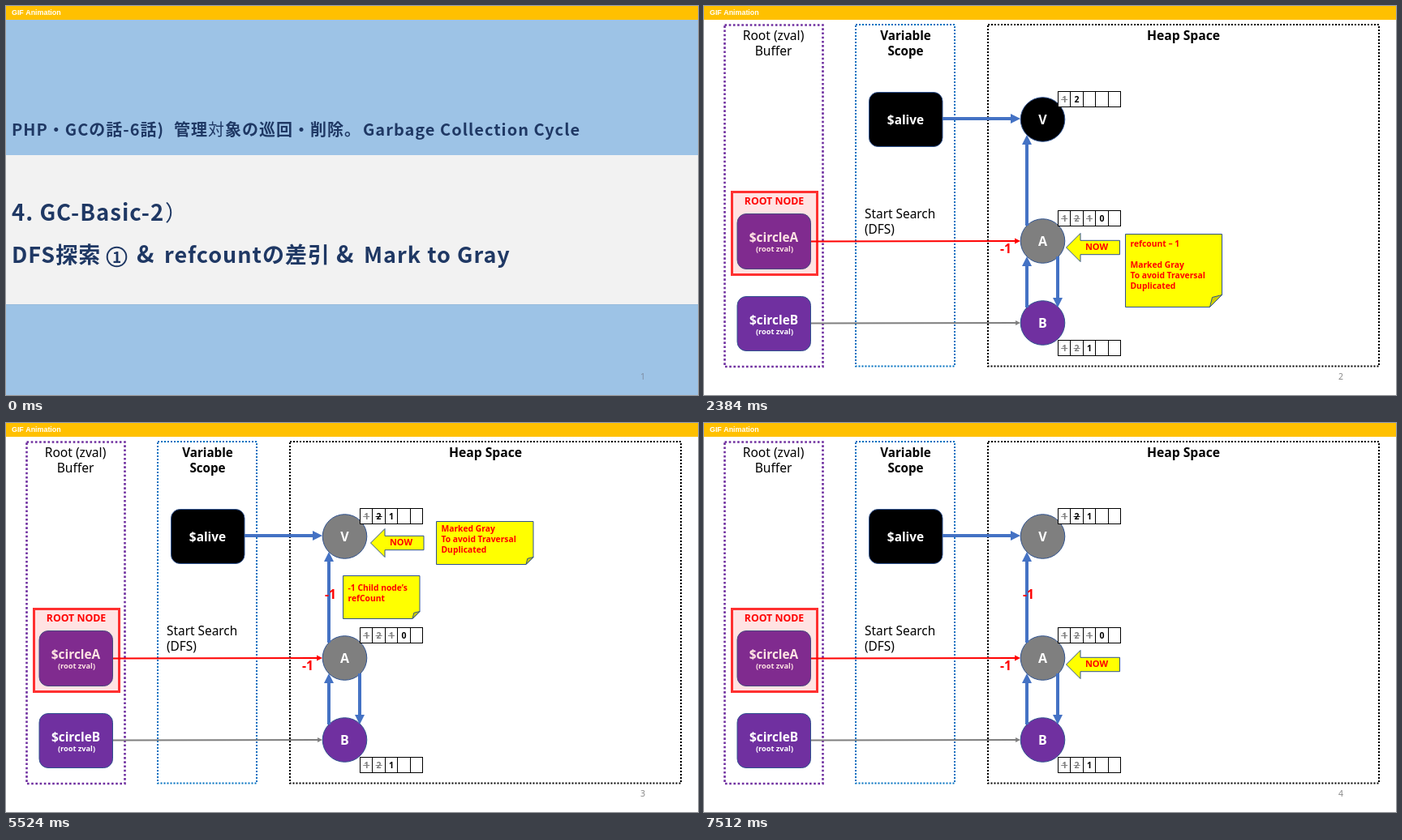
An HTML page with a canvas that plays this animation: 853x480 px, repeating every 8 s.

```html
<!DOCTYPE html>
<html lang="ja">
<head>
<meta charset="utf-8">
<title>GC cycle: mark to gray</title>
<style>
  html, body { margin: 0; width: 100%; height: 100%; overflow: hidden; background: #fff; }
  canvas { display: block; }
</style>
</head>
<body>
<canvas id="stage" width="853" height="480"></canvas>
<script>
const ctx = document.getElementById("stage").getContext("2d");
const LOOP = 8000;
const STARTS = [0, 500, 3640, 6780];
const SANS = '"Noto Sans", "Open Sans", sans-serif';
const CJK = '"Noto Sans CJK JP", "Noto Sans CJK", sans-serif';
const ARIAL = '"Liberation Sans", Arial, sans-serif';
const BLUE = "#4472c4", EDGE = "#2f528f", GRAY = "#7f7f7f";
const PURPLE = "#7030a0", RED = "#ff0000", NAVY = "#1f3864";

function text(str, x, y, size, { color = "#000", weight = 700, align = "center", family = SANS } = {}) {
  ctx.font = `${weight} ${size}px ${family}`;
  ctx.fillStyle = color;
  ctx.textAlign = align;
  ctx.fillText(str, x, y);
}

function heading(str, x, y, size, weight = 700) {
  ctx.letterSpacing = "1px";
  text(str, x, y, size, { color: NAVY, weight, align: "left", family: CJK });
  ctx.letterSpacing = "0px";
}

function rect(x, y, w, h, color) {
  ctx.fillStyle = color;
  ctx.fillRect(x, y, w, h);
}

function polygon(points, fill, stroke) {
  ctx.beginPath();
  points.forEach(([x, y]) => ctx.lineTo(x, y));
  ctx.closePath();
  ctx.fillStyle = fill;
  ctx.fill();
  if (stroke) {
    ctx.strokeStyle = stroke;
    ctx.lineWidth = 1;
    ctx.stroke();
  }
}

function dottedFrame(x, y, w, h, color, dot) {
  ctx.strokeStyle = color;
  ctx.lineWidth = dot;
  ctx.setLineDash([dot, dot]);
  ctx.strokeRect(x, y, w, h);
  ctx.setLineDash([]);
}

function arrow(x1, y1, x2, y2, color, width, head) {
  const length = Math.hypot(x2 - x1, y2 - y1);
  ctx.save();
  ctx.translate(x1, y1);
  ctx.rotate(Math.atan2(y2 - y1, x2 - x1));
  rect(0, -width / 2, length - head + 1, width, color);
  polygon([[length, 0], [length - head, -head / 2], [length - head, head / 2]], color);
  ctx.restore();
}

function box(y, h, fill, label, sub) {
  const x = sub ? 41 : 203.5;
  ctx.beginPath();
  ctx.roundRect(x, y, 90.5, h, 11);
  ctx.fillStyle = fill;
  ctx.fill();
  ctx.strokeStyle = EDGE;
  ctx.lineWidth = 1;
  ctx.stroke();
  text(label, x + 45, y + (sub ? 34.5 : 39.5), 15.4, { color: "#fff" });
  if (sub) text(sub, x + 46, y + 46.5, 9.2, { color: "#fff" });
}

function node(label, y, fill) {
  ctx.beginPath();
  ctx.arc(417.5, y, 27.3, 0, Math.PI * 2);
  ctx.fillStyle = fill;
  ctx.fill();
  ctx.strokeStyle = EDGE;
  ctx.lineWidth = 1;
  ctx.stroke();
  text(label, 417.5, y + 6, 16, { color: "#fff" });
}

// The last count is current; all earlier ones are struck out.
function counter(y, counts, darkFrom = counts.length - 1) {
  const x = 436.5, step = 15.4, h = 19;
  rect(x, y, step * 5, h, "#fff");
  ctx.strokeStyle = "#000";
  ctx.lineWidth = 1;
  ctx.strokeRect(x, y, 77, h);
  for (let i = 1; i < 5; i++) rect(Math.round(x + step * i - 0.5), y, 1, h, "#000");
  counts.forEach((n, i) => {
    const cx = x + step * (i + 0.5);
    const color = i < darkFrom ? GRAY : "#000";
    text(n, cx, y + 13.5, 10.5, { color });
    if (i < counts.length - 1) rect(cx - 4, y + 9.5, 8, 1, color);
  });
}

function nowArrow(x, y, width, neck) {
  polygon([
    [x, y], [x + neck, y - 17.5], [x + neck, y - 8.7], [x + width, y - 8.7],
    [x + width, y + 8.7], [x + neck, y + 8.7], [x + neck, y + 17.5]
  ], "#ffff00", EDGE);
  text("NOW", x + 37.5, y + 3, 11, { color: RED });
}

function note(x, y, w, h, fold, lines, firstLine) {
  const r = x + w, b = y + h;
  polygon([[x, y], [r, y], [r, b - fold], [r - fold, b], [x, b]], "#ffff00", EDGE);
  polygon([[r - fold, b], [r - fold * 0.8, b - fold * 0.8], [r, b - fold]], "#cdcd00", EDGE);
  lines.forEach((line, i) =>
    text(line, x + 6, firstLine + i * 13, 10.3, { color: RED, align: "left" }));
}

function circledOne(x, y) {
  ctx.beginPath();
  ctx.arc(x, y, 11.8, 0, Math.PI * 2);
  ctx.strokeStyle = NAVY;
  ctx.lineWidth = 2;
  ctx.stroke();
  text("1", x, y + 7, 19, { color: NAVY, family: CJK });
}

function titleSlide() {
  rect(0, 0, 853, 480, "#9dc3e6");
  rect(0, 184, 853, 184, "#f2f2f2");
  rect(0, 368, 853, 1, "#98bbdc");

  heading("PHP・GCの話-6話)", 7, 160, 20);
  heading("管理", 207, 160, 20);
  heading("対", 249, 160, 20, 400);
  heading("象の巡回・削除。", 270, 160, 20);
  heading("Garbage Collection Cycle", 440, 160, 20);

  heading("4. GC-Basic-2", 7, 265, 27.5);
  heading("）", 196, 265, 27, 400);

  heading("DFS探索", 7, 317, 27);
  circledOne(136.5, 309.5);
  heading("&", 161, 317, 29);
  heading("refcountの差引", 195, 317, 27);
  heading("&", 407, 317, 29);
  heading("Mark to Gray", 441, 317, 27);
}

function diagram(step) {
  const visitedV = step > 1;
  rect(0, 0, 853, 480, "#fff");

  dottedFrame(25.5, 23.5, 121, 421.5, PURPLE, 2.6);
  dottedFrame(187, 23, 122, 421.5, "#0070c0", 2);
  dottedFrame(350, 23, 482, 421.5, "#000", 2);
  text("Root (zval)", 85.5, 42, 15.6, { weight: 400 });
  text("Buffer", 85.5, 61, 15.6, { weight: 400 });
  text("Variable", 248.5, 42, 15.2);
  text("Scope", 248.5, 61, 15.2);
  text("Heap Space", 591, 42, 15.7);
  text("Start Search", 198, 262, 15.4, { weight: 400, align: "left" });
  text("(DFS)", 198, 281, 15.4, { weight: 400, align: "left" });

  box(106.5, 67, "#000", "$alive");
  box(256.5, 68, PURPLE, "$circleA", "(root zval)");
  box(358.5, 67, PURPLE, "$circleB", "(root zval)");

  rect(34.5, 229.5, 105, 102, "rgba(255,0,0,.11)");
  ctx.strokeStyle = "#ff3030";
  ctx.lineWidth = 3;
  ctx.strokeRect(34.5, 229.5, 105, 102);
  text("ROOT NODE", 86.5, 245, 12.3, { color: RED });

  node("V", 140, visitedV ? GRAY : "#000");
  node("A", 290, GRAY);
  node("B", 391, PURPLE);

  arrow(294, 139, 390, 139, BLUE, 4, 12);
  arrow(398, 271, 398, 159, BLUE, 4, 12);
  arrow(398, 372, 398, 309, BLUE, 4, 12);
  arrow(436, 309, 436, 372, BLUE, 4, 12);
  arrow(132, 290.5, 390, 290, RED, 2, 7);
  arrow(132, 391.5, 390, 391, GRAY, 2, 6);

  counter(105.5, visitedV ? [1, 2, 1] : [1, 2], 1);
  counter(252.5, [1, 2, 1, 0]);
  counter(412.5, [1, 2, 1]);

  text("-1", 372, 305, 15.7, { color: RED });
  if (visitedV) text("-1", 400, 217, 15.7, { color: RED });

  if (step === 2) {
    nowArrow(449.5, 148, 65.5, 17.5);
    note(530.5, 121.5, 119.5, 53, 9, ["Marked Gray", "To avoid Traversal", "Duplicated"], 134);
    note(415.5, 188.5, 94.5, 53, 9, ["-1 Child node’s", "refCount"], 207);
  } else {
    nowArrow(446.5, 298, 66, 17.5);
  }
  if (step === 1) {
    note(519.5, 281.5, 119, 90, 15,
      ["refcount – 1", "", "Marked Gray", "To avoid Traversal", "Duplicated"], 297);
  }
}

function draw(now) {
  const t = now % LOOP;
  const step = STARTS.filter(start => start <= t).length - 1;
  if (step === 0) titleSlide();
  else diagram(step);
  rect(0, 0, 853, 17, "#ffc000");
  text("GIF Animation", 7, 11, 8.9, { color: "#fff", align: "left", family: ARIAL });
  text(step + 1, 785, 461, 10.5, { color: step ? "#898989" : "#7f8ea3", weight: 400 });
}

function tick(now) {
  draw(now);
  requestAnimationFrame(tick);
}
draw(0);
requestAnimationFrame(tick);
</script>
</body>
</html>
```
